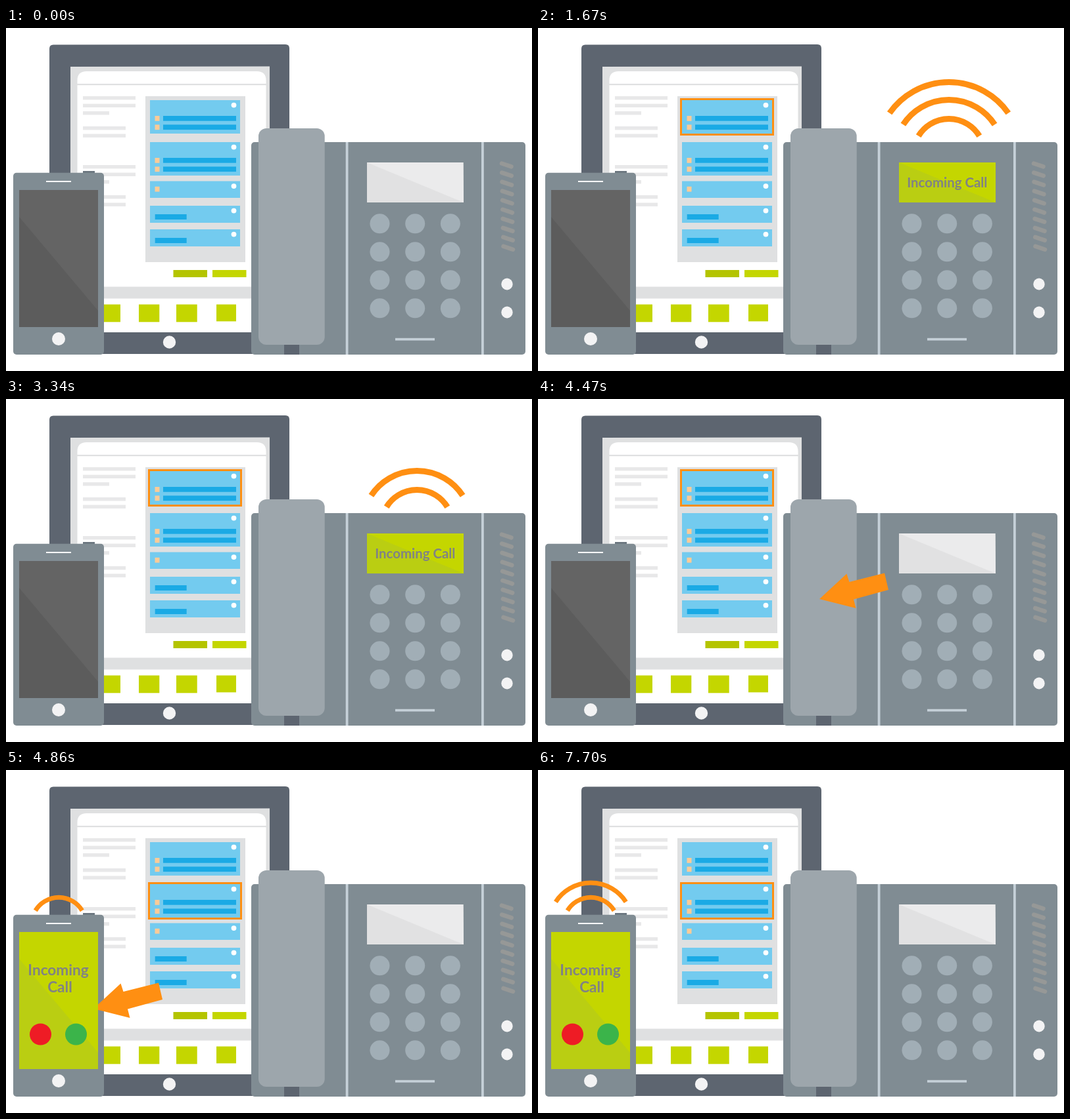
Write an HTML page that moves like this. It is 800 px wide and 523 px high and loops after 8000 ms.

```html
<!DOCTYPE html>
<html lang="en">
<head>
<meta charset="utf-8">
<title>Call forwarding</title>
<style>
  html, body { margin: 0; width: 100%; height: 100%; overflow: hidden; background: #fff; }
  svg { display: block; width: 100%; height: 100%; }
  text { font-family: Lato, "Open Sans", sans-serif; font-weight: 700; fill: #808285; text-anchor: middle; }
  .slate { fill: #5d6570; }
  .body { fill: #808c93; }
  .lime { fill: #c4d600; }
  .shade { fill: #bace12; }
  .white { fill: #fff; }
  .mist { fill: #dfe0e1; }
  .knob { fill: #f3f3f4; }
  .line { fill: #e8e8e9; }
  .card { fill: #73cbef; }
  .bar { fill: #1aaae5; }
  .tick { fill: #fbcb98; }
  .key { fill: #a1aeb6; }
  .trim { fill: #c5d0d8; }
  .slot { stroke: #969897; stroke-width: 6.5; stroke-linecap: round; }
  .arc { fill: none; stroke: #ff8f12; stroke-width: 9; }
</style>
</head>
<body>
<svg viewBox="0 0 800 523">
  <g id="tablet">
    <path class="slate" d="M72 25.5L425 25Q431 25 431 31V497H66V31.500Q66 25.500 72 25.500Z"/>
    <path class="mist" d="M98 59L401 58.500V464H98Z"/>
    <path class="white" d="M108.500 464V80Q108.500 66 122.500 66H381.500Q395.500 66 395.500 80V464Z"/>
    <rect class="mist" x="108" y="85" width="288" height="2.200"/>
    <rect class="mist" x="212" y="104" width="152" height="253"/>
    <rect class="mist" x="108" y="394.500" width="288" height="18"/>
    <rect x="254.500" y="369" width="51.500" height="11" fill="#b4c400"/>
    <rect class="lime" x="314" y="369" width="51.500" height="11"/>
    <circle class="knob" cx="248.500" cy="479" r="9.700"/>
  </g>
  <g id="desk">
    <rect class="body" x="373" y="174" width="417" height="324" rx="5"/>
    <rect class="trim" x="516.700" y="174" width="3.800" height="324"/>
    <rect class="trim" x="723" y="174" width="3.800" height="324"/>
    <rect class="slate" x="423" y="480" width="23" height="18"/>
    <rect x="384" y="153" width="100.700" height="330" rx="12" fill="#9da6ac"/>
    <path d="M549 205H695.500L696 266H549Z" fill="#e1e1e2"/>
    <path d="M549 205H695.500L696 266Z" fill="#ebebec"/>
    <rect class="trim" x="592" y="472.800" width="60" height="3.700"/>
    <ellipse class="knob" cx="762" cy="390.500" rx="8.700" ry="9"/>
    <ellipse class="knob" cx="762" cy="433.500" rx="8.700" ry="9"/>
  </g>
  <g id="deskCall">
    <rect class="lime" x="549" y="205" width="147" height="61"/>
    <path class="shade" d="M549 205L696 266H549Z"/>
    <text x="622.300" y="243" font-size="20.400">Incoming Call</text>
  </g>
  <g id="mobile">
    <rect x="117" y="218" width="18" height="5" fill="#6b767f"/>
    <rect class="body" x="11" y="220.700" width="138" height="277.300" rx="5"/>
    <rect class="white" x="61" y="233" width="38" height="2"/>
    <rect x="20" y="247" width="120" height="209" fill="#646464"/>
    <path d="M20 288L140 431V456H20Z" fill="#5c5c5c"/>
    <circle class="knob" cx="80" cy="474" r="10"/>
  </g>
  <rect id="highlight" x="217.500" y="108.500" width="140" height="54" fill="none" stroke="#ff8f12" stroke-width="3"/>
  <path id="arrow" d="M428 305L469.500 266.500L473.500 279L527 265.500L533 291L480 305.500L483.500 319Z" fill="#ff8f12"/>
  <g id="mobileCall">
    <rect class="lime" x="20" y="247" width="120" height="209"/>
    <path class="shade" d="M20 288L140 431V456H20Z"/>
    <text x="79.500" y="313" font-size="22.600">Incoming</text>
    <text x="82" y="339" font-size="22.600">Call</text>
    <circle cx="52.500" cy="403" r="16.500" fill="#ee1c25"/>
    <circle cx="106.500" cy="403" r="16.500" fill="#3bb44a"/>
  </g>
  <g id="deskWaves" transform="translate(625 192.500)"></g>
  <g id="mobileWaves" transform="translate(80.300 235.700) scale(.767)"></g>
</svg>
<script>
const LOOP = 8000, STEP = 30;
const SLIDE_START = 4470, SLIDE_END = 4860, ARROW_END = 4890;
const $ = id => document.getElementById(id);

function add(parent, tag, attrs) {
  const el = document.createElementNS("http://www.w3.org/2000/svg", tag);
  for (const name in attrs) el.setAttribute(name, attrs[name]);
  parent.append(el);
  return el;
}
const box = (parent, cls, x, y, width, height) =>
  add(parent, "rect", { class: cls, x, y, width, height });

// Tablet page: text lines, cards and icons
const tablet = $("tablet");
for (const top of [104, 209]) {
  [[0, 80], [11.600, 80], [23, 40], [46, 65], [57.500, 65]].forEach(([dy, w]) =>
    box(tablet, "line", 117, top + dy, w, 5.400));
}
const cards = [[110, 51, "list"], [174, 51, "list"], [233.500, 25.500, "tick"], [271, 26, "bar"], [307, 26, "bar"]];
for (const [y, h, kind] of cards) {
  box(tablet, "card", 219, y, 137, h);
  add(tablet, "circle", { class: "white", cx: 346.500, cy: y + 7.600, r: 3.900 });
  if (kind === "list") {
    for (const dy of [24, 37.400]) {
      box(tablet, "tick", 226.500, y + dy, 7, 7.800);
      box(tablet, "bar", 239, y + dy, 111, 7.700);
    }
  }
  if (kind === "tick") box(tablet, "tick", 226.500, y + 8.300, 7, 7.800);
  if (kind === "bar") box(tablet, "bar", 226.700, y + 13, 48, 8);
}
[[143, 31], [202, 31.300], [259, 31.700], [320, 30]].forEach(([x, w]) =>
  box(tablet, "lime", x, 421.500, w, w === 30 ? 25.800 : 26.800));

// Desk phone keypad and speaker slots
const desk = $("desk");
for (let i = 0; i < 12; i++) {
  add(desk, "circle", { class: "key", cx: 568.500 + i % 3 * 53.700, cy: 298.300 + Math.floor(i / 3) * 43, r: 15 });
}
for (let i = 0; i < 10; i++) {
  const x = 754 + i * 0.280, y = 206.500 + i * 14.050;
  add(desk, "line", { class: "slot", x1: x, y1: y, x2: x + 14.500, y2: y + 4.800 });
}

function makeWaves(id) {
  return [[54, 31], [83, 33], [110, 34.800]].map(([r, degrees]) => {
    const a = degrees * Math.PI / 180, x = r * Math.cos(a), y = -r * Math.sin(a);
    return add($(id), "path", { class: "arc", d: `M${-x} ${y}A${r} ${r} 0 0 1 ${x} ${y}` });
  });
}
const deskWaves = makeWaves("deskWaves"), mobileWaves = makeWaves("mobileWaves");

// [start time, desk arcs, mobile arcs]
const rings = [
  [0, 0, 0], [530, 1, 0], [1100, 2, 0], [1670, 3, 0], [2240, 0, 0], [2770, 1, 0],
  [3340, 2, 0], [3910, 3, 0], [4440, 0, 0], [4860, 0, 1], [5420, 0, 2], [5990, 0, 3],
  [6560, 0, 0], [7130, 0, 1], [7700, 0, 2]
];

const show = (el, on) => el.setAttribute("visibility", on ? "visible" : "hidden");

function render(t) {
  const [, deskCount, mobileCount] = rings.findLast(row => row[0] <= t);
  deskWaves.forEach((arc, i) => show(arc, i < deskCount));
  mobileWaves.forEach((arc, i) => show(arc, i < mobileCount));
  show($("deskCall"), t >= 530 && t < 4440);
  show($("mobileCall"), t >= SLIDE_END);
  show($("highlight"), t >= 530);
  show($("arrow"), t >= SLIDE_START && t < ARROW_END);

  const stepped = Math.floor((t - SLIDE_START) / STEP) * STEP;
  const p = Math.min(1, Math.max(0, stepped / (SLIDE_END - SLIDE_START)));
  $("highlight").setAttribute("transform", `translate(0 ${64 * p})`);
  $("arrow").setAttribute("transform", `translate(${-295 * p} ${59 * p})`);
}

const start = performance.now();
function tick() {
  render((performance.now() - start) % LOOP);
  requestAnimationFrame(tick);
}
tick();
</script>
</body>
</html>
```
